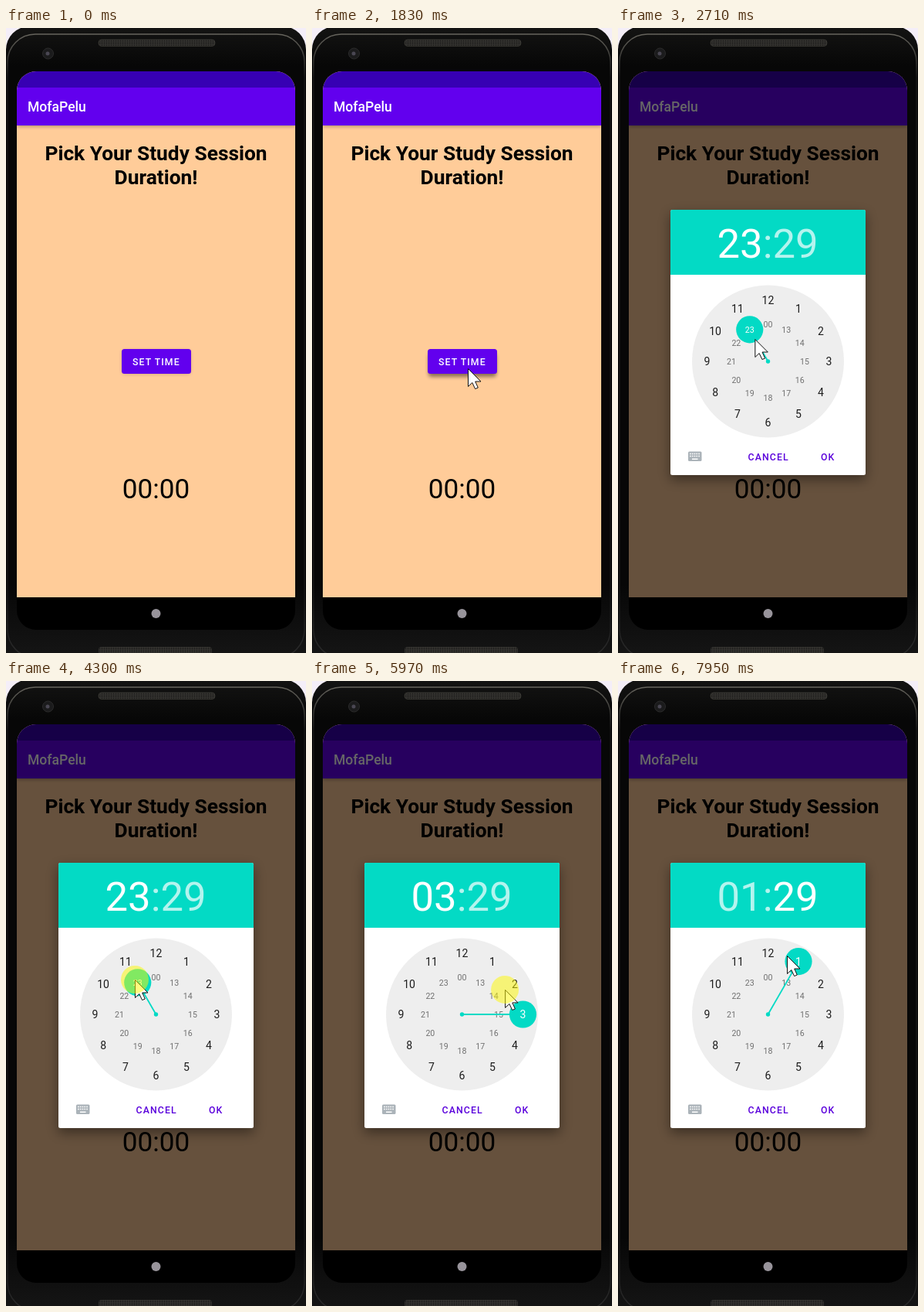
These frames come from a looping animation (389x808 px, 8000 ms). An HTML page:

```html
<!DOCTYPE html>
<html lang="en">
<head>
<meta charset="utf-8">
<title>Study timer</title>
<style>
  html, body { margin: 0; width: 100%; height: 100%; overflow: hidden; background: #f4eef8; }
  svg { display: block; width: 100%; height: 100%; font-family: Roboto, sans-serif; }
  .middle { text-anchor: middle; }
  .action { font-size: 12.3px; font-weight: 500; letter-spacing: 1.1px; }
</style>
</head>
<body>
<svg viewBox="0 0 389 808">
  <defs>
    <linearGradient id="shell" x2="0" y2="1">
      <stop stop-color="#141413"/>
      <stop offset=".06" stop-color="#070707"/>
      <stop offset=".85" stop-color="#070707"/>
      <stop offset=".95" stop-color="#141414"/>
    </linearGradient>
    <linearGradient id="rim" x2="0" y2="1">
      <stop stop-color="#66645d"/>
      <stop offset=".07" stop-color="#151515"/>
      <stop offset=".9" stop-color="#151515"/>
      <stop offset="1" stop-color="#2c2c2c"/>
    </linearGradient>
    <pattern id="mesh" width="3" height="3" patternUnits="userSpaceOnUse">
      <rect width="3" height="3" fill="#33322f"/>
      <circle cx="1.5" cy="1.5" r=".9" fill="#1b1a19"/>
    </pattern>
    <clipPath id="screen"><rect x="14" y="56" width="361" height="722" rx="25"/></clipPath>
    <filter id="blur" x="-30%" y="-60%" width="160%" height="220%"><feGaussianBlur stdDeviation="2.5"/></filter>
    <filter id="softBlur" x="-20%" y="-20%" width="140%" height="140%"><feGaussianBlur stdDeviation="8"/></filter>
  </defs>

  <rect y="-2" width="389" height="850" rx="30" fill="url(#shell)"/>
  <rect x="2" y="8" width="385" height="806" rx="36" fill="none" stroke="url(#rim)" stroke-width="1.5"/>
  <rect x="120" y="15" width="151" height="8.5" rx="4" fill="url(#mesh)" stroke="#45433d" stroke-width=".6"/>
  <rect x="120" y="800" width="147" height="10" rx="4" fill="url(#mesh)"/>
  <circle cx="54.5" cy="33" r="7" fill="#1b1b1c" stroke="#2b2b2b"/>
  <circle cx="54" cy="33" r="2.5" fill="#4a4753"/>

  <g clip-path="url(#screen)">
    <rect x="14" y="56" width="361" height="680" fill="#fc9"/>
    <rect x="14" y="80" width="361" height="47" opacity=".35" filter="url(#blur)"/>
    <rect x="14" y="56" width="361" height="21" fill="#3700b3"/>
    <rect x="14" y="77" width="361" height="49" fill="#6200ee"/>
    <text x="28" y="108" font-size="17.56" font-weight="500" fill="#fff">MofaPelu</text>
    <g class="middle" font-size="26.34" font-weight="700">
      <text x="194.5" y="171">Pick Your Study Session</text>
      <text x="194.5" y="202">Duration!</text>
    </g>
    <rect id="buttonShadow" x="151" y="417" width="88" height="30" rx="4" filter="url(#blur)"/>
    <rect x="150" y="415" width="90" height="32" rx="3.5" fill="#6200ee"/>
    <rect id="ripple" x="150" y="415" width="90" height="32" rx="3.5" fill="#fff"/>
    <text class="action" x="164" y="436" fill="#fff">SET TIME</text>
    <text class="middle" x="194.5" y="608" font-size="35.1">00:00</text>
    <rect id="dim" x="14" y="56" width="361" height="680"/>
    <rect x="14" y="736" width="361" height="42"/>
    <circle cx="194.5" cy="757" r="6" fill="#98949b"/>
  </g>

  <g id="dialog">
    <rect x="68" y="241" width="253" height="343" opacity=".42" filter="url(#softBlur)"/>
    <rect x="68" y="235" width="253" height="343" rx="2.5" fill="#fff"/>
    <path d="M68 319V237.5a2.5 2.5 0 0 1 2.5-2.5h248a2.5 2.5 0 0 1 2.5 2.5V319z" fill="#03dac5"/>
    <text x="128.5" y="297.2" font-size="52.7" fill="#fff"><tspan id="hour"></tspan><tspan fill-opacity=".7">:</tspan><tspan id="minute">29</tspan></text>
    <circle cx="194.5" cy="431" r="98.5" fill="#eee"/>
    <g id="numbers" class="middle"></g>
    <g fill="#03dac5">
      <circle cx="194.5" cy="431" r="2.7"/>
      <line id="hand" x1="194.5" y1="431" stroke="#03dac5" stroke-width="1.8"/>
      <circle id="knob" r="17.6"/>
    </g>
    <text id="picked" class="middle" fill="#fff"></text>
    <rect x="91" y="547.5" width="17.5" height="12.5" rx="1.6" fill="#abb3b9"/>
    <path d="M93 550.5h14M93 553.5h14" stroke="#fff" stroke-width="1.7" stroke-dasharray="1.7 1.1"/>
    <path d="M96 557.3h7.5" stroke="#fff" stroke-width="1.5"/>
    <g class="action" fill="#5a00dc">
      <text x="168.5" y="558.7">CANCEL</text>
      <text x="263" y="558.7">OK</text>
    </g>
  </g>

  <g id="cursor">
    <path d="M.5 .5V23.5L5.8 18.5L9.6 26.5L13.3 25L9.7 17H17z" fill="#fff" stroke="#111"/>
    <circle id="press" r="18" fill="#fffa00"/>
  </g>
</svg>
<script>
const LOOP = 8000, HOLD = 70, CX = 194.5, CY = 431;
const CLICK = 1080, OPEN = 1890, GRAB = 4300, RELEASE = 7890;
const $ = id => document.getElementById(id);
const set = (node, attrs) => {
  for (const name in attrs) node.setAttribute(name, attrs[name]);
};
const lerp = (a, b, p) => a + (b - a) * p;
const between = (t, from, to) => t >= from && t < to;

// Clock-face polar coordinates: angle runs clockwise from twelve.
const toPolar = ([x, y]) => ({ angle: Math.atan2(x - CX, CY - y), r: Math.hypot(x - CX, y - CY) });
const fromPolar = (angle, r) => [CX + r * Math.sin(angle), CY - r * Math.cos(angle)];

const line = (a, b, p) => [lerp(a[0], b[0], p), lerp(a[1], b[1], p)];
const arc = (a, b, p) => {
  const from = toPolar(a), to = toPolar(b);
  return fromPolar(lerp(from.angle, to.angle, p), lerp(from.r, to.r, p));
};

// The pointer's way: enter, go to the dial, drag down, around to one, and over the top.
const moves = [
  { start: 260, end: 880, path: line, from: [321, 659], to: [202, 440] },
  { start: 2430, end: 2850, path: line, from: [198, 434], to: [167, 386] },
  { start: 4520, end: 5270, path: line, from: [167, 392], to: [180, 475] },
  { start: 5340, end: 6110, path: arc, from: [196, 480], to: [227, 371], power: 1.18 },
  { start: 6180, end: 6390, path: arc, from: [222, 362], to: [197, 343] },
  { start: 6720, end: 7000, path: arc, from: [197, 343], to: [183, 341] },
  { start: 7000, end: 7490, path: arc, from: [183, 341], to: [219, 355], power: .6 }
];

function pointerAt(t) {
  const move = moves.findLast(m => m.start <= t);
  if (!move) return null;
  const { start, end, path, from, to, power = 1 } = move;
  const steps = Math.round((end - start) / HOLD);
  const p = Math.min(1, Math.floor((t - start) / (end - start) * steps + 1e-6) / steps);
  return path(from, to, p ** power);
}

function hourAt(point) {
  const { angle, r } = toPolar(point);
  const turn = (Math.round(angle / (Math.PI / 6)) + 12) % 12;
  return r > 62 ? turn || 12 : turn && turn + 12;
}

function place(hour) {
  const inner = hour === 0 || hour > 12;
  const [x, y] = fromPolar(hour * Math.PI / 6, inner ? 47.5 : 79);
  return { x, y, size: inner ? 10.6 : 14.05, fill: inner ? '#707070' : '#1c1c1c' };
}

function label(node, hour) {
  const { x, y, size } = place(hour);
  set(node, { x, y: y + size * .356, 'font-size': size });
  node.textContent = hour || '00';
}

for (let hour = 0; hour < 24; hour++) {
  const text = document.createElementNS('http://www.w3.org/2000/svg', 'text');
  label(text, hour);
  set(text, { fill: place(hour).fill });
  $('numbers').append(text);
}

function drawButton(t) {
  const raised = t >= CLICK + HOLD;
  set($('buttonShadow'), { opacity: raised ? .45 : .22, transform: `translate(0 ${raised ? 4 : 0})` });
  set($('ripple'), { opacity: between(t, CLICK + HOLD, 1680) ? .12 : 0 });
}

function drawDialog(t) {
  const held = Math.floor((t - OPEN) / HOLD) * HOLD;
  const open = t < OPEN ? 0 : Math.min(1, (held + 40) / 132);
  const shown = 1 - (1 - open) ** 2;
  set($('dim'), { opacity: .6 * open });
  set($('dialog'), {
    opacity: shown,
    transform: `translate(${CX} 406.5) scale(${lerp(.9, 1, shown)}) translate(${-CX} -406.5)`
  });

  // The dial answers the drag one step late.
  const hour = hourAt(pointerAt(Math.max(t, GRAB) - HOLD));
  const { x, y } = place(hour);
  const minutesActive = t >= RELEASE + 60;
  $('hour').textContent = String(hour).padStart(2, '0');
  set($('hour'), { 'fill-opacity': minutesActive ? .7 : 1 });
  set($('minute'), { 'fill-opacity': minutesActive ? 1 : .7 });
  set($('hand'), { x2: x, y2: y });
  set($('knob'), { cx: x, cy: y });
  label($('picked'), hour);
}

function drawCursor(t) {
  const tip = pointerAt(t);
  const pressed = between(t, CLICK, 1280) || between(t, GRAB, RELEASE);
  set($('cursor'), { visibility: tip ? 'visible' : 'hidden', transform: `translate(${tip || [0, 0]})` });
  set($('press'), { opacity: pressed ? .5 : 0 });
}

function frame() {
  const t = performance.now() % LOOP;
  drawButton(t);
  drawDialog(t);
  drawCursor(t);
  requestAnimationFrame(frame);
}
frame();
</script>
</body>
</html>
```
